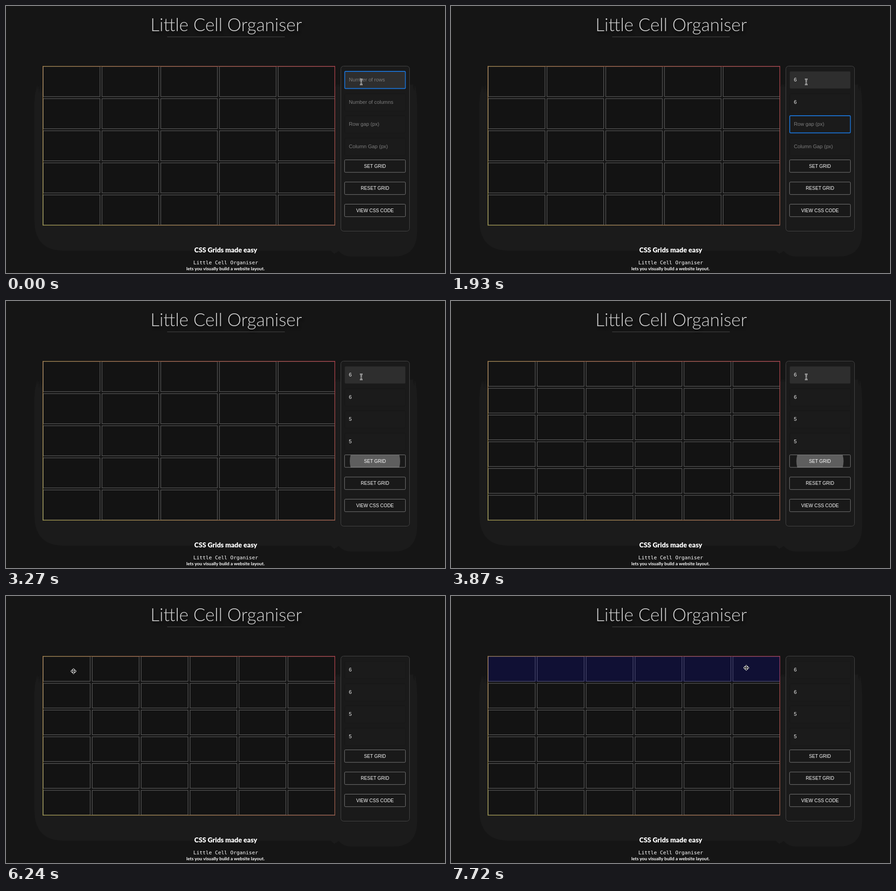
These frames come from a looping animation (959x584 px, 8 s). An HTML page:

```html
<!DOCTYPE html>
<html lang="en">
<head>
<meta charset="utf-8">
<title>Grid tool</title>
<style>
  html, body { margin: 0; width: 100%; height: 100%; overflow: hidden; background: #151515; }
  svg { display: block; width: 959px; height: 584px; }
  .ui { font-family: "Liberation Sans", Arial, sans-serif; }
  .lato { font-family: Lato, sans-serif; }
  .mono { font-family: "DejaVu Sans Mono", monospace; }
  .title { text-shadow: 2px 5px 5px #0b0b0b; }
</style>
</head>
<body>
<svg id="stage" viewBox="0 0 959 584" xmlns="http://www.w3.org/2000/svg">
  <defs>
    <linearGradient id="top"><stop stop-color="#ac8a48"/><stop offset=".5" stop-color="#b8654c"/><stop offset="1" stop-color="#bd3e49"/></linearGradient>
    <linearGradient id="bottom"><stop stop-color="#aaa04c"/><stop offset=".5" stop-color="#b08650"/><stop offset="1" stop-color="#b0624e"/></linearGradient>
    <linearGradient id="left" x2="0" y2="1"><stop stop-color="#b08048"/><stop offset="1" stop-color="#a7a048"/></linearGradient>
    <linearGradient id="right" x2="0" y2="1"><stop stop-color="#bd3e49"/><stop offset="1" stop-color="#a8644c"/></linearGradient>
    <clipPath id="buttonClip"><rect x="740" y="337" width="132" height="27" rx="2"/></clipPath>
  </defs>
  <rect width="959" height="584" fill="#151515"/>

  <!-- soft shadows below the grid and the panel -->
  <path fill="#1b1b1b" d="M69 170L67 185L71 174L72 192L75 170L77 192L80 176H731L729 168L727 180L725 170L723 182L721 172H890L886 182L888 170L892 186L893 172Q898 190 898 215V494Q898 548 846 548H752Q736 547 727 536L717 542L709 535H122Q62 533 62 468V210Q63 188 69 170Z"/>

  <text class="lato title" x="481" y="55" font-size="39" font-weight="300" fill="#d6d6d6" text-anchor="middle">Little Cell Organiser</text>
  <path d="M352 67.5H609" stroke="#484848"/>

  <rect x="80" y="131" width="639" height="349" fill="#131313"/>
  <g id="cells" fill="none" stroke="#6c6c6c"></g>
  <rect x="80" y="131.4" width="639" height="1.2" fill="url(#top)"/>
  <rect x="80" y="478.9" width="639" height="1.2" fill="url(#bottom)"/>
  <rect x="80" y="131.4" width="1.2" height="348.7" fill="url(#left)"/>
  <rect x="717.8" y="131.4" width="1.2" height="348.7" fill="url(#right)"/>
  <rect id="selection" x="81" y="132" height="55.5" fill="#00f" opacity=".14"/>

  <rect x="731.5" y="131.5" width="150" height="361" rx="6" fill="#1a1a1a" stroke="#474747"/>
  <g id="panel" class="ui"></g>

  <g fill="#fff" text-anchor="middle">
    <text class="lato" x="480" y="539" font-size="14.7" font-weight="900">CSS Grids made easy</text>
    <text class="mono" x="480" y="565" font-size="11.2">Little Cell Organiser</text>
    <text class="lato" x="479.5" y="578" font-size="10" font-weight="700">lets you visually build a website layout.</text>
  </g>

  <g id="beam" fill="none">
    <path d="M-3-6Q0-6 0-4Q0-6 3-6M0-4V4M-3 6Q0 6 0 4Q0 6 3 6" stroke="#eee" stroke-width="2.6"/>
    <path d="M-3-6Q0-6 0-4Q0-6 3-6M0-4V4M-3 6Q0 6 0 4Q0 6 3 6M-1.5 1H1.5" stroke="#222" stroke-width=".8"/>
  </g>
  <path id="move" fill="#111" stroke="#f4f4f4" stroke-width="1.8" stroke-linejoin="round" paint-order="stroke"
    d="M0-5.4L2.3-3H.7V-.7H3V-2.3L5.4 0L3 2.3V.7H.7V3H2.3L0 5.4L-2.3 3H-.7V.7H-3V2.3L-5.4 0L-3-2.3V-.7H-.7V-3H-2.3Z"/>
</svg>
<script>
const LOOP = 8000, STEP = 148.5;
const $ = id => document.getElementById(id);

function add(parent, tag, attrs, text = "") {
  const el = document.createElementNS("http://www.w3.org/2000/svg", tag);
  set(el, attrs);
  el.textContent = text;
  parent.appendChild(el);
  return el;
}
function set(el, attrs) {
  for (const key in attrs) el.setAttribute(key, attrs[key]);
}
const show = (el, on) => set(el, { visibility: on ? "visible" : "hidden" });
const clamp = x => Math.max(0, Math.min(1, x));

// cubic-bezier(.4, 0, .2, 1)
function ease(x) {
  let lo = 0, hi = 1;
  for (let i = 0; i < 20; i++) {
    const u = (lo + hi) / 2, v = 1 - u;
    if (1.2 * u * v * v + .6 * u * u * v + u ** 3 < x) lo = u; else hi = u;
  }
  return 3 * lo * lo - 2 * lo ** 3;
}

// Grid with n rows and n columns
const GAP = 3.5, WIDTH = 637.8, HEIGHT = 347.5;
const cellSize = (total, n) => (total - GAP * (n - 1)) / n;
function makeGrid(n) {
  const g = add($("cells"), "g", {});
  const w = cellSize(WIDTH, n), h = cellSize(HEIGHT, n);
  for (let i = 0; i < n * n; i++) {
    const x = 81 + (i % n) * (w + GAP), y = 132 + Math.floor(i / n) * (h + GAP);
    add(g, "rect", { x: x + .5, y: y + .5, width: w - 1, height: h - 1 });
  }
  return g;
}
const gridBefore = makeGrid(5), gridAfter = makeGrid(6);
const GRID_SET = 3570;

// Inputs: focus, typing and blur times
const fields = [
  { hint: "Number of rows", value: "6", y: 142, focus: 0, typed: 450, blur: 740 },
  { hint: "Number of columns", value: "6", y: 191, focus: 740, typed: 1190, blur: 1480 },
  { hint: "Row gap (px)", value: "5", y: 239, focus: 1480, typed: 2380, blur: 2530 },
  { hint: "Column Gap (px)", value: "5", y: 288, focus: 2530, typed: 2830, blur: 3120 }
];
for (const f of fields) {
  f.box = add($("panel"), "rect", { x: 740, y: f.y + 1, width: 132.5, height: 37.5, rx: 2 });
  f.text = add($("panel"), "text", { x: 749, y: f.y + 23, "font-size": 11.2 });
  f.caret = add($("panel"), "rect", { y: f.y + 13, width: 1, height: 13, fill: "#ddd" });
}

const buttons = ["SET GRID", "RESET GRID", "VIEW CSS CODE"];
const buttonY = i => 336.5 + 48.5 * i;
buttons.forEach((_, i) => add($("panel"), "rect", {
  x: 739.6, y: buttonY(i), width: 133, height: 27.3, rx: 2, fill: "#191919", stroke: "#7c7c7c"
}));
const rippleClip = add($("panel"), "g", { "clip-path": "url(#buttonClip)" });
const ripple = add(rippleClip, "circle", { cx: 806, cy: 350.5, fill: "#fff" });
buttons.forEach((label, i) => add($("panel"), "text", {
  x: 806, y: buttonY(i) + 17.4, "font-size": 10.2, fill: "#fff", "text-anchor": "middle"
}, label));

// Pointer path: time, x, y
const path = [
  [4460, 776, 166], [4610, 708, 172], [4760, 570, 186], [4910, 400, 200], [5050, 264, 204.5],
  [5200, 196, 196], [5350, 160, 180], [5640, 144, 169], [5790, 141, 166], [6240, 147.5, 164.5],
  [6530, 144, 165], [6680, 144, 165], [6830, 172, 164], [6980, 255, 162], [7130, 350, 160],
  [7280, 450, 158], [7430, 540, 157], [7570, 610, 156.5], [7720, 645, 157]
];
function pointerAt(t) {
  const i = path.findIndex(p => p[0] > t);
  if (i === 0) return path[0].slice(1);
  if (i < 0) return path[path.length - 1].slice(1);
  const a = path[i - 1], b = path[i], k = (t - a[0]) / (b[0] - a[0]);
  return [a[1] + (b[1] - a[1]) * k, a[2] + (b[2] - a[2]) * k];
}

function drawField(f, t, hover) {
  const focused = t >= f.focus && t < f.blur, typed = t >= f.typed;
  set(f.box, {
    fill: hover ? "#2e2e2e" : "#1b1b1b",
    stroke: focused ? "#1a70cf" : hover ? "#222" : "#171717",
    "stroke-width": focused ? 1.8 : 1
  });
  f.text.textContent = typed ? f.value : f.hint;
  set(f.text, { fill: typed ? "#f4f4f4" : "#7c7c7c" });
  set(f.caret, { x: typed ? 756 : 749 });
  show(f.caret, focused && t >= 450 && (typed || t < f.focus + 450));
}

function drawRipple(t) {
  const cycle = Math.max(0, t - 3170) / 1350, phase = cycle % 2;
  const dip = phase < 1 ? ease(phase) : 1 - ease(phase - 1);
  const enter = clamp((t - 3020) / 200), leave = clamp((t - 5640) / 550);
  set(ripple, {
    r: 55 * (1 - .08 * dip) * ease(enter),
    opacity: .3 * enter * (1 - leave)
  });
  show(ripple, t >= 3115);
}

function draw(t) {
  // the screen is sampled at a fixed step
  const s = Math.floor((t + 3) / STEP) * STEP + 3;
  const [x, y] = pointerAt(s);
  const overInput = x >= 740;

  fields.forEach((f, i) => drawField(f, t, i === 0 && overInput));
  drawRipple(s);

  show(gridBefore, t < GRID_SET);
  show(gridAfter, t >= GRID_SET);

  const w = cellSize(WIDTH, 6), column = Math.floor((x - 81) / (w + GAP));
  set($("selection"), { width: (column + 1) * (w + GAP) - GAP });
  show($("selection"), t >= 6830);

  const at = { transform: `translate(${x} ${y})` };
  set($("beam"), at);
  set($("move"), at);
  show($("beam"), overInput);
  show($("move"), !overInput);
}

function tick() {
  draw(performance.now() % LOOP);
  requestAnimationFrame(tick);
}
tick();
</script>
</body>
</html>
```
